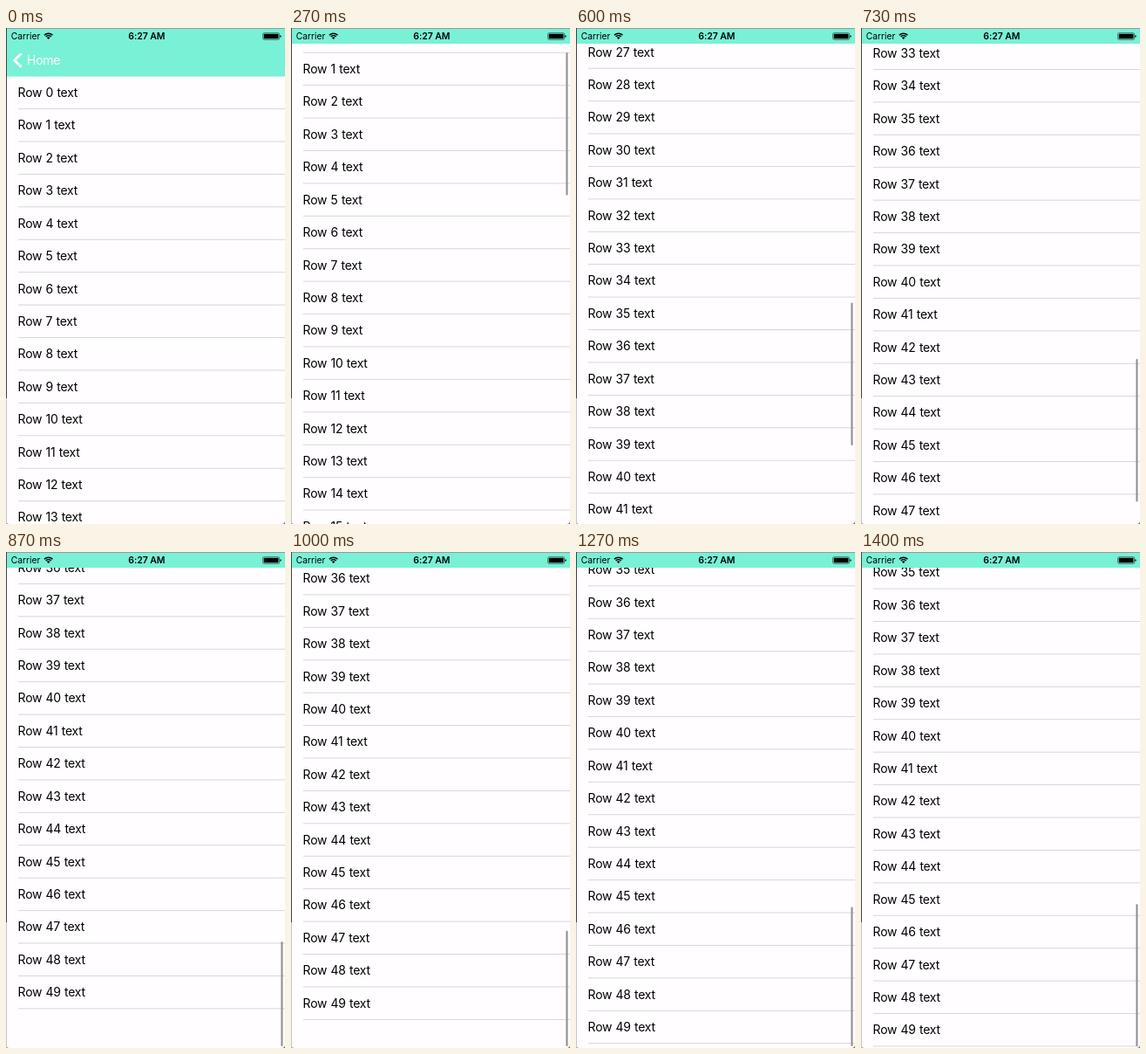
Write an HTML page that moves like this. It is 320 by 568 pixels and loops after 1.47 s.

```html
<!DOCTYPE html>
<html lang="en">
<head>
<meta charset="utf-8">
<title>Scrolling list</title>
<style>
  html, body { margin: 0; width: 100%; height: 100%; overflow: hidden; background: #fffdff; }
  svg { display: block; width: 320px; height: 568px; }
  text { font-family: Inter, Roboto, sans-serif; }
  .row, .home { font-size: 14px; letter-spacing: -.25px; word-spacing: .6px; }
  .home { fill: #fff; }
  .status { font-size: 10.3px; }
  .clock { font-size: 10.5px; font-weight: 600; letter-spacing: -.1px; text-anchor: middle; }
</style>
</head>
<body>
<svg viewBox="0 0 320 568">
  <rect width="320" height="568" fill="#fffdff"/>
  <g id="list"></g>
  <path d="M0 564Q0 568 4 568H0ZM320 564Q320 568 316 568H320Z" fill="#777"/>
  <rect id="thumb" x="315.4" width="2.1" rx="1" fill="#908f92"/>
  <rect id="bar" width="320" fill="#79f1d6"/>
  <g id="nav">
    <path d="M17.6 29.2L9.8 37L17.6 44.8" fill="none" stroke="#fff" stroke-width="3"/>
    <text class="home" x="24" y="42">Home</text>
  </g>
  <rect width="320" height="1" fill="#999"/>
  <rect width="1" height="424" fill="#444"/>
  <rect y="424" width="1" height="144" fill="#c4c4c4"/>
  <text class="status" x="5.7" y="13.3">Carrier</text>
  <g fill="none" stroke="#000" stroke-width="1.5">
    <path d="M43.9 8.2A6.8 6.8 0 0 1 53.5 8.2M45.7 10A4.3 4.3 0 0 1 51.7 10"/>
    <path d="M48.7 13L46.8 11.1A2.7 2.7 0 0 1 50.6 11.1Z" fill="#000" stroke="none"/>
  </g>
  <text class="clock" x="161.3" y="13.4">6:27 AM</text>
  <rect x="294.6" y="5.7" width="19" height="7.6" rx="1.5" fill="none" stroke="#000" stroke-width=".5"/>
  <rect x="295.7" y="6.8" width="16.8" height="5.4" rx=".6"/>
  <path d="M314.3 8.2Q315.8 8.4 315.8 9.5Q315.8 10.6 314.3 10.8Z"/>
</svg>
<script>
const LOOP = 1470, ROWS = 50, PITCH = 37.42;
const NAV = 37.5, BAR = 55.5, REST = 1358.5, EDGE_TIME = 791;
const DRAG = [0, 6, 16, 36, 64.4, 205];
const STEPS = Array.from({ length: 22 }, (_, i) => Math.round(i * 20 / 3) * 10);

const $ = id => document.getElementById(id);
const list = $('list'), bar = $('bar'), nav = $('nav'), thumb = $('thumb');

list.innerHTML = Array.from({ length: ROWS }, (_, i) => {
  const y = 74 + i * PITCH;
  return `<text class="row" x="13.6" y="${y + 5}">Row ${i} text</text>` +
    `<rect x="14" y="${y + 18.1}" width="306" height="1" fill="#d8d6da"/>`;
}).join('');

// Finger drag, then friction, then a critically damped bounce at the end.
function offset(step) {
  if (step < DRAG.length) return DRAG[step];
  const t = STEPS[step];
  if (t < EDGE_TIME) return 1280 - 468 * (Math.exp(.003 * (730 - t)) - 1);
  const s = (t - EDGE_TIME) / 1000;
  return REST + 1250 * s * Math.exp(-10 * s);
}

function draw(step) {
  const off = offset(step);
  const hidden = Math.min(off, NAV);
  const head = BAR - hidden;
  const over = Math.max(0, off - REST);
  const top = head + 2.3 + .2886 * (off - over - hidden) + over;

  list.setAttribute('transform', `translate(0 ${-off})`);
  bar.setAttribute('height', head);
  nav.setAttribute('transform', `translate(0 ${-hidden})`);
  nav.setAttribute('opacity', 1 - hidden / NAV);
  thumb.setAttribute('opacity', step ? 1 : 0);
  thumb.setAttribute('y', top);
  thumb.setAttribute('height', Math.min(163.5, 566 - top));
}

let start;
function tick(now) {
  start ??= now;
  const t = (now - start) % LOOP;
  draw(STEPS.filter(s => s <= t).length - 1);
  requestAnimationFrame(tick);
}
draw(0);
requestAnimationFrame(tick);
</script>
</body>
</html>
```
